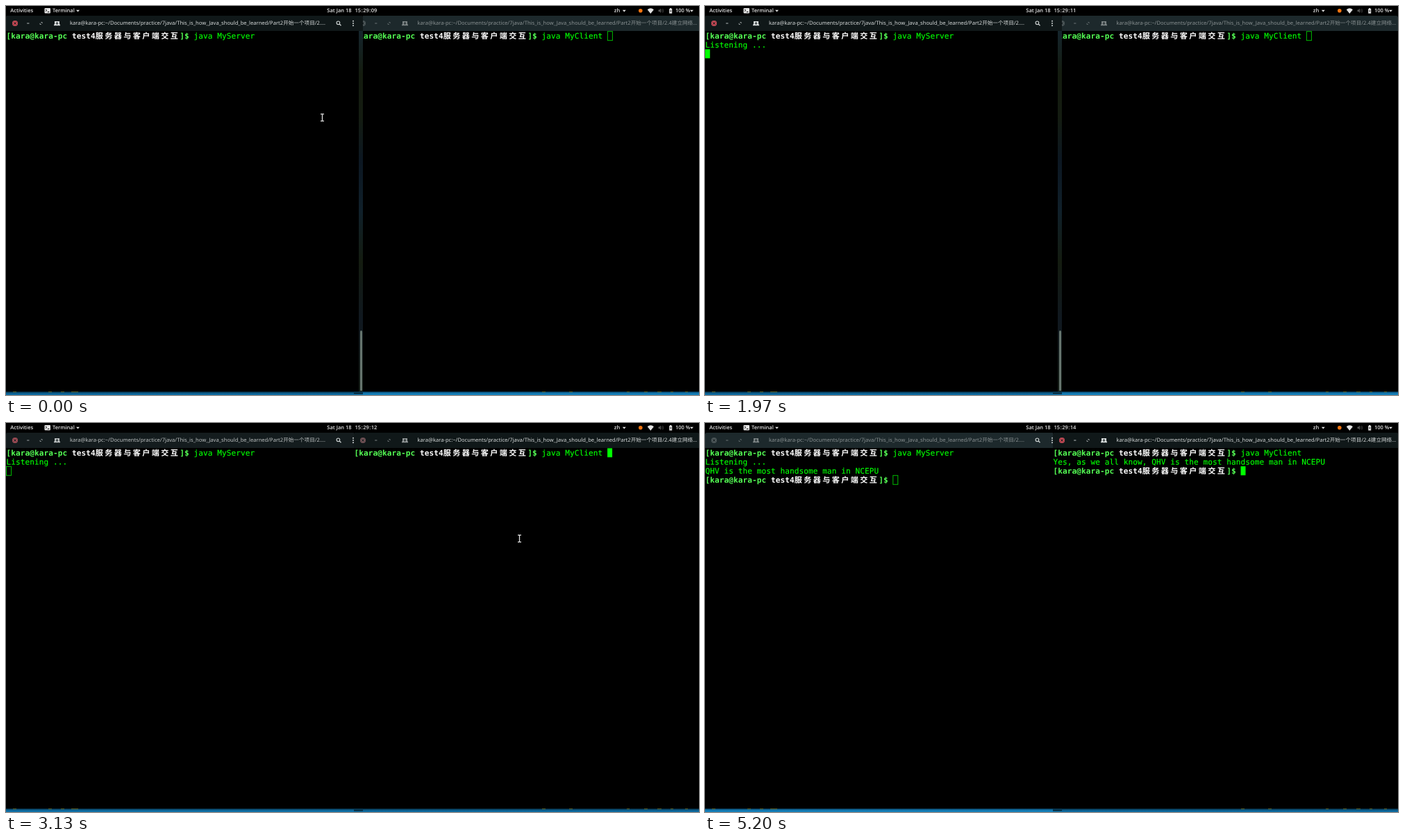
Recreate the animation shown at these times as an HTML page. Size 998 px wide and 561 px high, loop 5540 ms.

```html
<!DOCTYPE html>
<html lang="zh-CN">
<head>
<meta charset="utf-8">
<title>Two terminals</title>
<style>
html, body { margin: 0; width: 100%; height: 100%; overflow: hidden; background: #000; }
#stage { position: relative; width: 998px; height: 561px; overflow: hidden; background: #000; text-rendering: geometricPrecision; }
#stage * { box-sizing: border-box; }
#stage div, #stage svg, #panel span { position: absolute; top: 0; white-space: pre; }

#stage #panel { left: 0; width: 998px; height: 14px; color: #e4e4e4; font: 600 7.5px/14px "Open Sans", "Noto Sans", sans-serif; }
#panel svg { left: 0; }
#panel i { font-style: normal; margin: 0 .5px; }

#stage #desk { left: 0; top: 556px; width: 998px; height: 5px; background: linear-gradient(#04202f, #0b5c8a 45%, #0d70a9); }
#stage .glow { height: 5px; background: linear-gradient(#06304a, #1276ae 45%, #1583bd); }
#stage .chip { height: 1px; background: #5d6a35; }

#stage .win { top: 14px; height: 542px; background: #000; overflow: hidden; }
.bar { left: 0; width: 100%; height: 22px; background: #1d292c; border-radius: 3px 3px 0 0; overflow: hidden; }
.bar .lit { inset: 0; background: #101819; opacity: var(--lit); }
#stage .title { top: 4px; height: 14px; color: #d6dada; opacity: calc(.58 + .42 * var(--lit));
  font: 7.6px/14px "Noto Sans", "Noto Sans CJK SC", "Noto Sans CJK", sans-serif; }
.bar svg { left: 0; }
.dim { opacity: calc(.5 + .5 * var(--icons)); }
.red { opacity: var(--icons); }

.row { height: 13px; color: #0f0; letter-spacing: .08px; -webkit-text-stroke: .15px;
  font: 11.09px/13px "DejaVu Sans Mono", "Noto Sans CJK SC", "Noto Sans CJK", monospace; }
.row b { color: #55ff55; -webkit-text-stroke: 0; }
.row b.dir { color: #fff; }
.row b.han { letter-spacing: 2.424px; }
.caret { left: 0; width: 7px; height: 13px; }
.caret.full { background: #0f0; }
.caret.hollow { width: 8px; height: 14px; border: 1px solid #0b0; }

#stage #trough { left: 508px; top: 22px; width: 6px; height: 520px;
  background: linear-gradient(#15252d, #141c0f 12%, #141c11 24%, #0c1722 36%, #10202a 50%, #141c10 64%, #101820 80%, #131c14); }
#stage #thumb { left: 509.5px; top: 454px; width: 3px; height: 87px; border-radius: 1.5px; background: #66756e; }
#mouse { left: 0; z-index: 9; }
</style>
</head>
<body>
<div id="stage">
  <div id="desk"></div>
  <div id="panel">
    <span style="left:6.3px">Activities</span>
    <span style="left:67px">Terminal</span>
    <span style="left:462.3px">Sat Jan 18</span>
    <span id="clock" style="left:502.6px"></span>
    <span style="left:875.8px">zh</span>
    <span style="left:964px">100 %</span>
    <svg width="998" height="14" fill="#e4e4e4">
      <rect x="55.5" y="3" width="8.5" height="7.5" rx="1"/>
      <path d="M57 4.8l1.8 1.5-1.8 1.5M59.8 8.5h2.6" fill="none" stroke="#000" stroke-width=".9"/>
      <path d="M101 5.7h5l-2.5 2.8zM887.8 5.7h5l-2.5 2.8zM985 5.7h5l-2.5 2.8z"/>
      <circle cx="913.8" cy="6.8" r="2.8" fill="#f5750f"/>
      <path d="M928.3 11l-4.6-5.8q4.6-3.8 9.2 0z"/>
      <g fill="#555" stroke="#555">
        <path d="M939.5 5.6h1.6l2-2v6.4l-2-2h-1.6z" stroke="none"/>
        <path d="M944.3 5q1.4 1.8 0 3.6M945.7 3.8q2.2 3 0 6" fill="none" stroke-width=".7"/>
      </g>
      <path d="M955.2 4h1v-1h2v1h1v6.8h-4z"/>
      <path d="M957.6 5l-1.3 2.4h1l-.4 2 1.4-2.6h-1z" fill="#000"/>
    </svg>
  </div>
  <div id="left" class="win"></div>
  <div id="right" class="win"></div>
  <svg id="mouse" width="8" height="13" fill="none" stroke="#e4e4e4" stroke-width="1.3">
    <path d="M1.5 1h2l.5.5.5-.5h2M4 1.5v9M1.5 11h2l.5-.5.5.5h2"/>
  </svg>
</div>
<script>
const LOOP = 5540;
const ENTER_LEFT = 1370, LISTEN = 1970, MOVE = [2400, 2770], FOCUS = 3030,
      FADE = [3070, 3270], BLINK = 3630, ENTER_RIGHT = 4130, REPLY = 4730, DONE = 4900;
const CELL = 6.757, LINE = 13;
const USER = "kara", HOST = "kara-pc", WHO = "QHV";

const $ = id => document.getElementById(id);
const progress = (t, [from, to]) => Math.min(1, Math.max(0, (t - from) / (to - from)));
const prompt = `<b>[${USER}@${HOST} </b><b class="dir">test4</b>` +
  `<b class="dir han">服务器与客户端交互</b><b>]$</b> `;
const path = `${USER}@${HOST}:~/Documents/practice/7java/This_is_how_Java_should_be_learned/Part2开始一个项目/2.`;

function add(parent, cls, css, html = "") {
  const el = document.createElement("div");
  el.className = cls;
  Object.assign(el.style, css);
  el.innerHTML = html;
  parent.append(el);
  return el;
}

const buttons = `
  <circle r="4" fill="#4b5557" stroke="none"/>
  <circle class="red" r="4" fill="#bd4550" stroke="none"/>
  <path d="M-1.5-1.5l3 3M1.5-1.5l-3 3" stroke="#141c1e" stroke-width=".9"/>
  <g class="dim">
    <path d="M17.2 0h3.2" stroke-width=".9"/>
    <path d="M36-.2v1.7h1.7M37.4-1.5h1.7v1.7" stroke-width=".7"/>
    <path d="M57-3h7v4.6h1v1.6h-9V1.6h1z" fill="#d8dcdc" stroke="none"/>
    <path d="M60.5-2v4M58.5 0h4" stroke="#141c1e" stroke-width=".9"/>
  </g>`;
const menu = `
  <circle cx="465.4" cy="-.7" r="2.3" stroke-width="1.1"/>
  <path d="M467.2 1l2.3 2.3" stroke-width="1.3"/>
  <path d="M487-3.3v.01M487 0v.01M487 3.3v.01" stroke-width="2" stroke-linecap="round"/>`;
const icons = (x, shapes) => `<svg width="520" height="22" fill="none" stroke="#cfd4d4">
  <g transform="translate(${x} 11)">${shapes}</g></svg>`;

function terminal(id, x, width, title, shapes, lines) {
  const win = $(id), textX = .5;
  Object.assign(win.style, { left: x + "px", width: width + "px" });
  const bar = add(win, "bar", {}, `<div class="lit"></div>`);
  add(bar, "title", { left: (x ? 91.5 : 92) + "px" }, title);
  bar.insertAdjacentHTML("beforeend", icons(13, shapes));
  const rows = lines.map(([at, html], i) => ({
    at, el: add(win, "row", { left: textX + "px", top: 23 + LINE * i + "px" }, html)
  }));
  const caret = add(win, "caret", {});
  const glow = add($("desk"), "glow", { left: x + "px", width: width + "px" });
  return {
    win,
    draw(t, lit, iconLit, [col, row], focused, shown) {
      win.style.setProperty("--lit", lit);
      win.style.setProperty("--icons", iconLit);
      glow.style.opacity = 1 - lit;
      for (const r of rows) r.el.style.visibility = t >= r.at ? "visible" : "hidden";
      const shift = focused ? -.3 : -.5;
      caret.className = "caret " + (focused ? "full" : "hollow");
      caret.style.transform =
        `translate(${textX + shift + col * CELL}px, ${22.7 + shift + LINE * row}px)`;
      caret.style.visibility = shown ? "visible" : "hidden";
    }
  };
}

const left = terminal("left", 0, 514, path + "…", buttons + menu, [
  [0, prompt + "java MyServer"],
  [LISTEN, "Listening ..."],
  [REPLY, `${WHO} is the most handsome man in NCEPU`],
  [DONE, prompt]
]);
add(left.win, "", {}).id = "trough";
add(left.win, "", {}).id = "thumb";

const right = terminal("right", 501, 497, path + "4建立网络…", buttons, [
  [0, prompt + "java MyClient"],
  [DONE, `Yes, as we all know, ${WHO} is the most handsome man in NCEPU`],
  [DONE, prompt]
]);

// slivers of the desktop below the windows
for (const x of [10, 61, 79, 94, 98, 772, 811, 894, 919, 938, 957, 978])
  add($("desk"), "chip", { left: x + "px", width: 4 + x % 3 + "px" });
add($("desk"), "", { left: "501px", width: "13px", height: "4px", background: "#06354f" });

const leftCaret = t => t < ENTER_LEFT ? [54, 0] : t < LISTEN ? [0, 1] :
  t < REPLY ? [0, 2] : t < DONE ? [0, 3] : [40, 3];
const rightCaret = t => t < ENTER_RIGHT ? [54, 0] : t < DONE ? [0, 1] : [40, 2];

function draw(t) {
  const sec = 9 + Math.floor((t + 330) / 1000);
  $("clock").innerHTML = `15<i>:</i>29<i>:</i>${String(sec).padStart(2, "0")}`;

  const swapped = t >= FOCUS;
  const k = progress(t, FADE);
  left.win.style.zIndex = swapped ? 1 : 2;
  right.win.style.zIndex = swapped ? 2 : 1;
  left.draw(t, 1 - k, 1 - k, leftCaret(t), !swapped, t >= 800);
  right.draw(t, +swapped, k, rightCaret(t), swapped,
    !(t >= BLINK && t < ENTER_RIGHT) && !(t >= REPLY && t < DONE));

  const p = progress(t, MOVE);
  const e = p * p * (3 - 2 * p);
  const seen = t < ENTER_LEFT || (t >= MOVE[0] && t < ENTER_RIGHT);
  $("mouse").style.visibility = seen ? "visible" : "hidden";
  $("mouse").style.transform = `translate(${451.5 + 284 * e}px, ${154.8 + 5.8 * e}px)`;
}

const start = performance.now();
function tick() {
  draw((performance.now() - start) % LOOP);
  requestAnimationFrame(tick);
}
tick();
</script>
</body>
</html>
```
